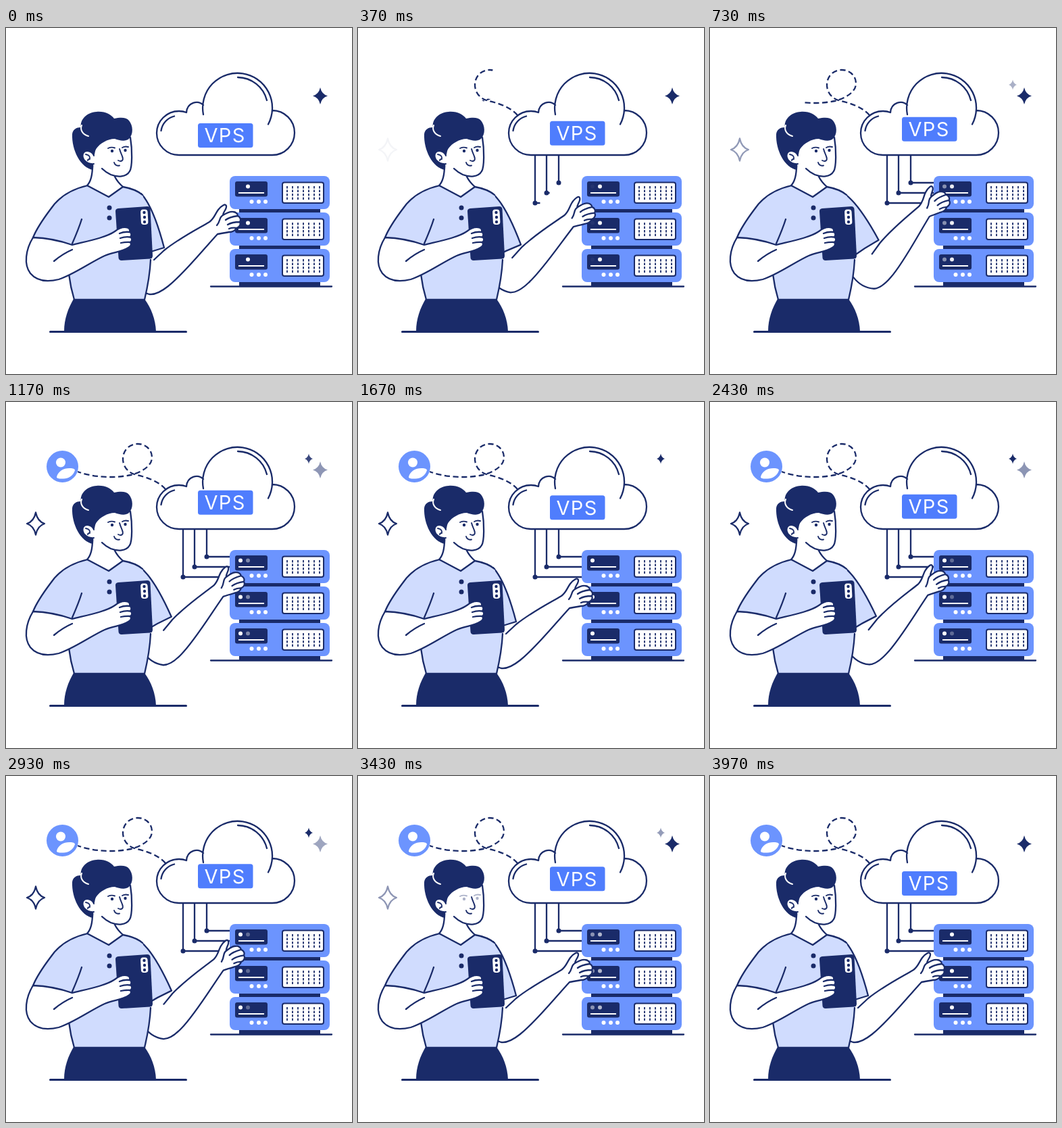
Animation of 512 by 512 pixels, one loop 4000 ms. Source, as an HTML page:

```html
<!DOCTYPE html>
<html lang="en">
<head>
<meta charset="utf-8">
<title>VPS hosting</title>
<style>
  html, body { margin: 0; width: 100%; height: 100%; overflow: hidden; background: #fff; }
  svg { display: block; width: 100vw; height: 100vh; }
  .line { fill: none; stroke: #1a2b69; stroke-width: 2.3; stroke-linecap: round; stroke-linejoin: round; }
  .thin { stroke-width: 1.9; }
  .ground { stroke-width: 3; }
  .dashed { stroke-dasharray: 9 5; stroke-linecap: butt; }
  .skin, .white { fill: #fff; }
  .shirt { fill: #d0dcfe; }
  .navy { fill: #1a2b69; }
  .blue { fill: #6c94fe; }
  .draw { stroke-dasharray: 1 2; stroke-linecap: butt; }
  #wipe { stroke-dasharray: 300 600; }
  text { font: 400 29px Inter, "Open Sans", sans-serif; letter-spacing: 1.3px; fill: #fff; }
</style>
</head>
<body>
<svg viewBox="0 0 512 512">
  <defs>
    <path id="trail" pathLength="300" d="M236 129C226 117 207 111 190 107C181 104 173 96 173 84C173 72 182 62 195 62C206 62 216 70 216 82C216 95 200 104 185 108C160 113 130 112 106 103"/>
    <mask id="reveal" maskUnits="userSpaceOnUse" x="0" y="0" width="512" height="512">
      <use id="wipe" href="#trail" fill="none" stroke="#fff" stroke-width="6"/>
    </mask>
    <g id="server">
      <rect class="blue" x="331" y="219" width="148" height="49" rx="8"/>
      <rect class="navy" x="339" y="227" width="48" height="22.5" rx="3"/>
      <path d="M344 244H382" stroke="#fff" stroke-width="2"/>
      <g class="white">
        <circle cx="363.500" cy="257" r="3"/><circle cx="374" cy="257" r="3"/><circle cx="384" cy="257" r="3"/>
        <circle class="ledA" cx="347" cy="234.5" r="3"/><circle class="ledB" cx="358" cy="234.5" r="3"/>
      </g>
      <rect x="409" y="228.5" width="61" height="30.5" rx="3" fill="#fff" stroke="#1a2b69" stroke-width="2"/>
      <path d="M416 234v20m8-20v20m8-20v20m8-20v20m8-20v20m8-20v20m8-20v20" stroke="#1a2b69" stroke-width="1.8" stroke-dasharray="3.5 2" fill="none"/>
    </g>
  </defs>

  <!-- network -->
  <g mask="url(#reveal)"><use href="#trail" class="line dashed"/></g>
  <g id="avatar">
    <circle class="blue" cx="83.5" cy="95.5" r="23.5"/>
    <circle class="white" cx="81" cy="89.500" r="7"/>
    <path class="white" d="M75 111C77 102 86 97.500 95 98C99 98 102 99 102 101C100 109 92 113.500 85 113.500C81 113.500 75 114 75 111Z"/>
  </g>
  <g id="cables"></g>

  <!-- cloud -->
  <path class="white" d="M394 122A33 33 0 0 1 394 188H256A33 32.500 0 0 1 256 123Q262 123 267 125C268 110 284 106 292 114A51.500 51.500 0 0 1 394 122Z"/>
  <path class="line" d="M394 122A33 33 0 0 1 394 188H256A33 32.500 0 0 1 256 123Q262 123 267 125C268 110 284 106 292 114M292 128A51.500 51.500 0 1 1 388 142.500M343 73A45 45 0 0 1 386 107M229.500 152A26 26 0 0 1 249 130.500"/>
  <g id="label">
    <rect x="284" y="141" width="81.500" height="36" rx="3.5" fill="#4f7dfd"/>
    <text x="293.500" y="169.500">VPS</text>
  </g>

  <!-- rack -->
  <path class="navy" d="M345 266H465V383H345Z"/>
  <path class="line" d="M303 382.500H482"/>
  <use href="#server"/><use href="#server" y="54"/><use href="#server" y="108"/>

  <!-- far arm -->
  <g id="forearm">
    <path class="skin" d="M190 300L234 329L306 283C310 276 316 267 322 262C326 260 327 264 325 268C323 272 321 274 321 277C326 274 332 271 336 272C340 272 343 275 343 278C347 280 348 284 346 287C348 291 345 295 341 296C339 300 335 302 330 302C324 303 318 304 313 305C290 330 262 365 240 382C230 390 220 395 212 394C200 391 191 383 185 371L178 330Z"/>
    <path class="line" d="M219 343L234 329C258 310 284 297 301 287C308 282 309 276 314 269C317 265 320 263 322 262C326 260 327 264 325 268C323 272 321 274 321 277C326 274 332 271 336 272C340 272 343 275 343 278C347 280 348 284 346 287C348 291 345 295 341 296C339 300 335 302 330 302C324 303 318 304 313 305C290 330 262 365 240 382C230 390 220 395 212 394C200 391 191 383 185 371M321 277C315 280 318 285 312 292M343 278C336 279 330 280 325 284M346 287C339 287 333 288 328 291M341 296Q335 295 330 297"/>
  </g>
  <g id="sleeve">
    <path class="shirt" d="M200 245C212 258 224 287 234 325Q212 331 190 340L185 260Z"/>
    <path class="line" d="M200 245C212 258 224 287 234 325Q212 331 190 340"/>
  </g>

  <!-- body -->
  <path class="navy" d="M100 401H205C215 415 221 430 222 449H86C86 430 92 415 100 401Z"/>
  <path class="line ground" d="M65.500 449.500H266.500"/>
  <path class="shirt" d="M121 233C95 239 78 250 66 268C54 284 44 300 40 310Q70 311 98 321L93 366C95 380 98 392 101 402H205C209 385 213 365 214 345L206 262L202 247C194 240 184 237 173 235L152 250Z"/>
  <path class="line" d="M121 233C95 239 78 250 66 268C54 284 44 300 40 310M93 364C95 380 98 392 101 402H205C209 385 213 365 214 343M202 247C194 240 184 237 173 235M112 283Q108 296 98 319"/>
  <circle class="navy" cx="153" cy="266" r="3.5"/><circle class="navy" cx="153" cy="281" r="3.5"/>

  <!-- head -->
  <path class="skin" d="M128 200C128 215 126 227 120 233L152 250L173 235L161 219Z"/>
  <path class="line" d="M128 203C128 215 126 227 120 233L152 250L173 235Q165 228 161 220"/>
  <path class="skin" d="M125 160H184C187 180 187 206 183 212C178 221 165 221 155 217C149 214 145 211 142 208L126 203Z"/>
  <path class="line" d="M184 162C187 180 187 206 183 212C178 221 165 221 155 217C149 214 145 211 142 208"/>
  <path class="navy" d="M129 210C110 207 97 180 98 157C99 150 104 147 111 147C109 136 119 125 134 124C147 123 155 128 160 134C170 132 178 132 182 137C188 144 189 157 182 164C176 169 167 166 161 164C150 164 139 171 134 178C131 182 132 186 130 190Z"/>
  <path d="M112 144C109 151 114 158 122 160" fill="none" stroke="#fff" stroke-width="2" stroke-linecap="round"/>
  <path class="skin" d="M130 189C127 181 117 180 114 186C112 193 118 202 130 201Z"/>
  <path class="line thin" d="M130 189C127 181 117 180 114 186C112 193 118 202 130 201M118 187Q125 188 124 194Q121 194 121 196"/>
  <path class="line thin" d="M168 179C170 187 175 193 172 196Q170 198 166 196M160 199Q162 205 168 203.500"/>
  <g id="eyes">
    <circle class="navy" cx="157" cy="182" r="2.200"/><circle class="navy" cx="176.500" cy="181" r="2.200"/>
    <path class="line thin" d="M151 178Q156 175.500 161 177.500M172 177Q176 174.500 181 176"/>
  </g>

  <!-- phone -->
  <path class="navy" d="M166 267L209 264Q213 264 213.500 268L217 337Q217 341 213 341.500L171 344Q167 344 166.500 340L162 271Q162 267.500 166 267Z"/>
  <rect class="white" x="199.500" y="268.500" width="10.500" height="22.500" rx="4" transform="rotate(-3 205 280)"/>
  <g class="navy"><circle cx="204.500" cy="273" r="2.200"/><circle cx="205" cy="280" r="2.200"/><circle cx="205" cy="287" r="2.200"/></g>

  <!-- near arm -->
  <path class="skin" d="M40 310C29 328 26 350 36 363C46 375 62 376 78 372C100 365 126 346 146 337C158 332 172 331 181 325C185 323 186 320 184 317C187 315 187 311 184 309.500C186 307 186 303 183 302C184 298 182 295 178 295C171 294 166 297 161 301C148 310 122 315 98 321Q70 311 40 310Z"/>
  <path class="line" d="M98 321Q70 311 40 310C29 328 26 350 36 363C46 375 62 376 78 372C100 365 126 346 146 337C158 332 172 331 181 325C185 323 186 320 184 317C187 315 187 311 184 309.500C186 307 186 303 183 302C184 298 182 295 178 295C171 294 166 297 161 301C148 310 122 315 98 321ZM71 345Q84 334 98 328M183 302Q175 301 168 304M184 309.500Q176 308.500 169 311M184 317Q177 316.500 170 318"/>

  <!-- stars -->
  <g id="starL"></g><g id="starS"></g><g id="starR"></g>
</svg>
<script>
const LOOP = 4000;
const $ = id => document.getElementById(id);
const all = q => [...document.querySelectorAll(q)];

const linear = u => u;
const smooth = u => (1 - Math.cos(Math.PI * u)) / 2;
const clamp = u => Math.max(0, Math.min(1, u));

// Value at time t in a table of [time, value] steps.
function at(t, steps, ease = linear) {
  const i = steps.findIndex(s => s[0] > t);
  if (i < 0) return steps[steps.length - 1][1];
  if (!i) return steps[0][1];
  const [t0, a] = steps[i - 1], [t1, b] = steps[i];
  return a + (b - a) * ease((t - t0) / (t1 - t0));
}

function star(id, x, y, w, h, look) {
  const c = 0.2, p = w * c, q = h * c;
  $(id).innerHTML = `<path ${look} transform="translate(${x} ${y})"
    d="M0 ${-h}Q${p} ${-q} ${w} 0Q${p} ${q} 0 ${h}Q${-p} ${q} ${-w} 0Q${-p} ${-q} 0 ${-h}Z"/>`;
}
star('starL', 44, 180, 13, 16.5, 'class="line" style="fill:#fff"');
star('starS', 448, 84, 6, 7.5, 'class="navy"');
star('starR', 465, 100.5, 11, 12.5, 'class="navy"');

$('cables').innerHTML = [[297, 229], [279, 244], [262, 259]].map(([x, y]) =>
  `<path class="line draw" pathLength="1" d="M${x} 188V${y}H332"/>
   <circle class="navy" cx="${x}" cy="${y}" r="3.5"/>`).join('');

const cables = all('#cables path'), joints = all('#cables circle');
const ledA = all('.ledA'), ledB = all('.ledB');

const ARM = [[0, 0], [833, 1], [1667, 0], [2000, 0], [2667, 1], [3333, 0]];
const GLOW = [[330, 0], [1170, 1], [3000, 1], [3850, 0]];
const GLOW_SMALL = [[400, 0], [1300, 1], [3000, 1], [3800, 0]];
const TWINKLE = [[0, 1], [830, 1], [1500, 0], [1800, 0], [2430, .5], [2930, .42], [3400, 1]];
const LED = [[0, 1], [830, .9], [1500, 0], [1800, 0], [2430, .3], [2930, .3], [3900, 1]];
const BLINK = [[3330, 1], [3440, .3], [3500, .3], [3620, 1]];
const POP = [[820, 0], [1130, 1]];

function render(t) {
  const k = at(t, ARM, smooth);
  const swing = `rotate(${-14.3 * k} 195 255)`;
  $('sleeve').setAttribute('transform', swing);
  $('forearm').setAttribute('transform', `${swing} rotate(${2.8 * k} 225 355)`);

  // The label floats up and down twice per loop.
  $('label').setAttribute('transform', `translate(0 ${-11 * smooth(t / 1000)})`);

  $('wipe').style.strokeDashoffset = 300 * (1 - clamp(t / 833));
  const p = clamp(t / 667);
  cables.forEach(c => {
    c.style.strokeDashoffset = 1 - p;
    c.style.visibility = p ? 'visible' : 'hidden';
  });
  joints.forEach(j => j.style.visibility = p > .52 ? 'visible' : 'hidden');

  const pop = at(t, POP, smooth);
  $('avatar').setAttribute('transform', `translate(83.5 95.5) scale(${pop}) translate(-83.5 -95.5)`);

  const glow = at(t, GLOW), led = at(t, LED);
  $('starL').style.opacity = glow;
  $('starS').style.opacity = at(t, GLOW_SMALL);
  $('starR').style.opacity = at(t, TWINKLE);
  ledA.forEach(e => e.style.opacity = glow);
  ledB.forEach(e => e.style.opacity = led);
  $('eyes').style.opacity = at(t, BLINK);
}

const start = performance.now();
function tick() {
  render((performance.now() - start) % LOOP);
  requestAnimationFrame(tick);
}
tick();
</script>
</body>
</html>
```
